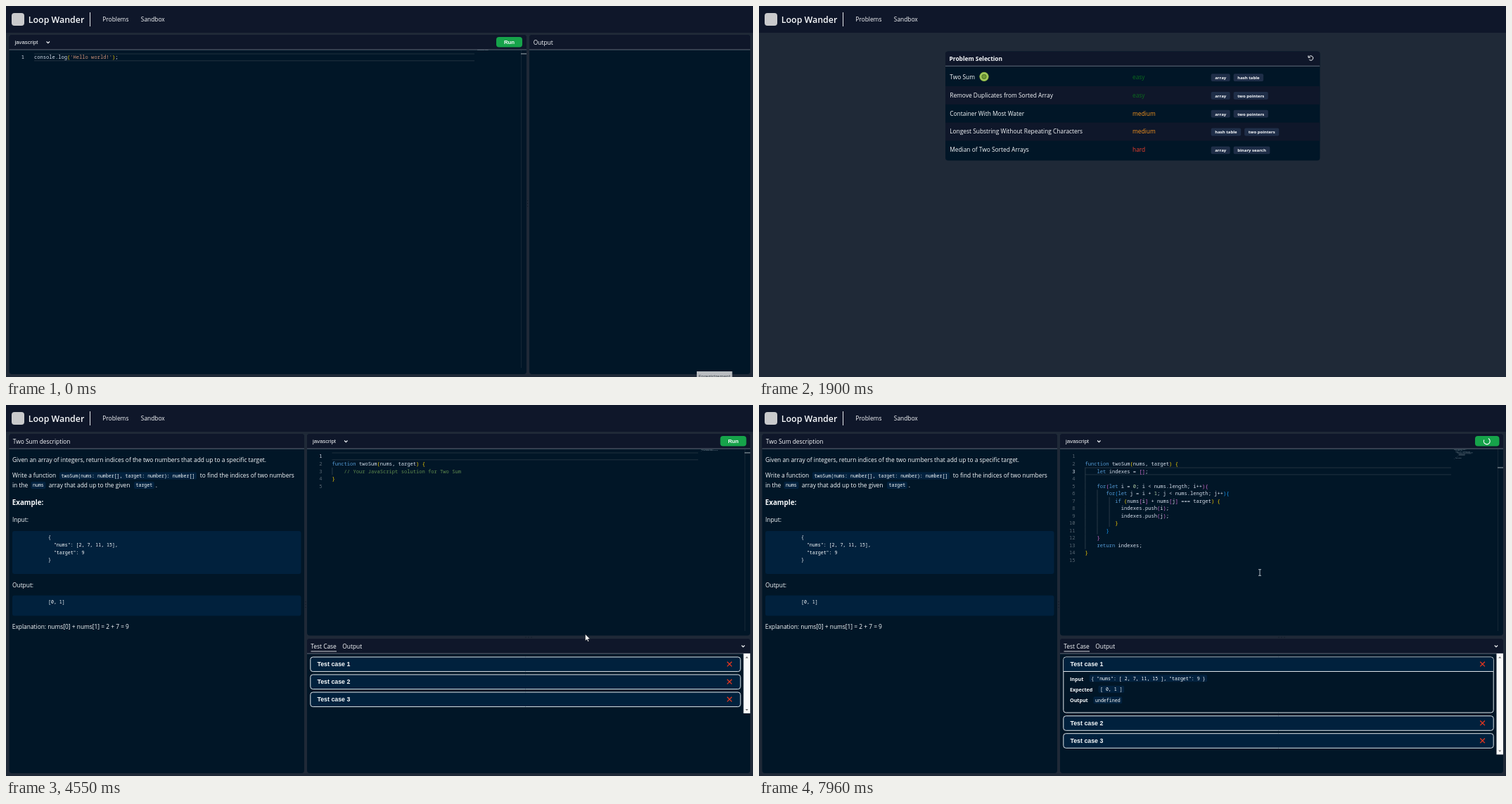
These frames come from a looping animation (1062 px wide and 527 px high, 8 s). An HTML page with a canvas:

```html
<!DOCTYPE html>
<html lang="en">
<head>
<meta charset="utf-8">
<title>Loop Wander</title>
<style>
html, body { margin: 0; width: 100%; height: 100%; overflow: hidden; background: #1f2937; }
canvas { display: block; }
</style>
</head>
<body>
<canvas id="stage" width="1062" height="527"></canvas>
<script>
const ctx = document.getElementById('stage').getContext('2d');
const LOOP = 8000, STEP = 70;
const UI = '"Open Sans", "Noto Sans", sans-serif';
const ARIAL = '"Liberation Sans", Arial, sans-serif';
const MONO = '"Noto Sans Mono", "DejaVu Sans Mono", monospace';
const C = {
  page: '#1f2937', bar: '#0f172a', editor: '#011627', block: '#01213d',
  rule: '#6b7280', white: '#f8fafc', green: '#16a34a', lit: '#16cb56', tag: '#1f2e48'
};

const T = {
  tip: 140, problems: 890, list: 1260, press: 1820, released: 2030,
  hover: 2640, run: 2980, result: 3810, expand: 4970, leave: 5600,
  paste: 6020, hover2: 6790, rerun: 6930
};

const HELLO = ["console.log('Hello world!');"];
const STUB = ['', 'function twoSum(nums, target) {', '    // Your JavaScript solution for Two Sum', '}', ''];
const SOLVED = [
  '',
  'function twoSum(nums, target) {',
  '    let indexes = [];',
  '',
  '    for(let i = 0; i < nums.length; i++){',
  '       for(let j = i + 1; j < nums.length; j++){',
  '          if (nums[i] + nums[j] === target) {',
  '            indexes.push(i);',
  '            indexes.push(j);',
  '          }',
  '       }',
  '    }',
  '    return indexes;',
  '}',
  ''
];
const PROBLEMS = [
  ['Two Sum', 'easy', 'array', 'hash table'],
  ['Remove Duplicates from Sorted Array', 'easy', 'array', 'two pointers'],
  ['Container With Most Water', 'medium', 'array', 'two pointers'],
  ['Longest Substring Without Repeating Characters', 'medium', 'hash table', 'two pointers'],
  ['Median of Two Sorted Arrays', 'hard', 'array', 'binary search']
];
const LEVEL = { easy: '#0b6b1d', medium: '#f7941d', hard: '#ef3f2c' };

// Pointer track: time, x, y, shape while heading to the next point
const TRACK = [
  [70, 1000, 524, 'arrow'], [560, 190, 34, 'arrow'], [630, 156, 20.5, 'hand'],
  [1120, 156, 20.5, 'arrow'], [1610, 318, 96, 'hand'], [2100, 318, 96, 'arrow'],
  [2500, 975, 53, 'arrow'], [2640, 1041, 47.5, 'hand'], [3120, 1041, 47.5, 'arrow'],
  [3260, 1020, 85, 'beam'], [3740, 970, 191, 'beam'], [4270, 970, 191, 'beam'],
  [4550, 823.5, 325.5, 'arrow'], [4830, 632, 368, 'hand'], [5600, 632, 368, 'arrow'],
  [5670, 626, 325, 'beam'], [5880, 600, 183, 'beam'], [6230, 600, 183, 'beam'],
  [6720, 1000, 56, 'arrow'], [6790, 1034, 49, 'hand'], [7000, 1034, 49, 'arrow'],
  [7070, 1005, 75, 'beam'], [7550, 712, 238, 'beam']
];

function rect(x, y, w, h, color) {
  ctx.fillStyle = color;
  ctx.fillRect(x, y, w, h);
}

function box(x, y, w, h, r, fill, stroke) {
  ctx.beginPath();
  ctx.roundRect(x, y, w, h, r);
  if (fill) { ctx.fillStyle = fill; ctx.fill(); }
  if (stroke) { ctx.strokeStyle = stroke; ctx.lineWidth = 1; ctx.stroke(); }
}

function line(points, color, width) {
  ctx.beginPath();
  points.forEach(([x, y], i) => i ? ctx.lineTo(x, y) : ctx.moveTo(x, y));
  ctx.strokeStyle = color;
  ctx.lineWidth = width;
  ctx.stroke();
}

// Vertically centred on the capitals
function text(str, x, cy, { size = 8.4, font = UI, weight = 400, color = C.white, align = 'left' } = {}) {
  ctx.font = `${weight} ${size}px ${font}`;
  ctx.textAlign = align;
  ctx.fillStyle = color;
  ctx.fillText(str, x, cy + size * 0.357);
  return ctx.measureText(str).width;
}

function chevron(x, y) {
  line([[x - 2.2, y - 1], [x, y + 1.2], [x + 2.2, y - 1]], C.white, 1.1);
}

function panel(x, y, w, h) {
  box(x, y, w, h, 4, C.editor);
  box(x, y, w, 21, [4, 4, 0, 0], C.bar);
  rect(x, y + 20.6, w, 0.9, C.rule);
}

function dots(x, y, dx, dy) {
  for (let i = -1; i < 2; i++) rect(x + i * dx, y + i * dy, 1, 1, '#0d1521');
}

function navbar() {
  rect(0, 0, 1062, 38, C.bar);
  box(8, 10, 18, 18, 4, '#c9cacc');
  text('Loop Wander', 31.8, 19.5, { size: 12.4, weight: 600 });
  rect(119, 9, 1, 20, '#e5e7eb');
  text('Problems', 137.3, 19);
  text('Sandbox', 191.8, 19);
}

function runButton(x, state, t) {
  if (state === 'busy') {
    box(x + 2.5, 44, 34.5, 14.5, 4, C.green);
    const gap = t / 1000 * Math.PI * 2 - 7.6;
    ctx.beginPath();
    ctx.arc(1034.8, 51.4, 4.4, gap + 0.8, gap + Math.PI * 2 - 0.8);
    ctx.strokeStyle = C.white;
    ctx.lineWidth = 1.2;
    ctx.stroke();
    return;
  }
  box(x, 44, 37, 14.5, 4, state === 'hover' ? C.lit : C.green);
  text('Run', x + 18.5, 51.5, { size: 7.8, font: ARIAL, weight: 700, align: 'center' });
}

const BRACKETS = ['#ffd700', '#da70d6', '#179fff'];
const TOKEN = /\/\/.*|'[^']*'|[A-Za-z]+|\d+|[()[\]{}]|\s+|[^\w\s]/g;

function codeLine(src, x, cy, depth) {
  const cw = 4.272;
  for (const m of src.matchAll(TOKEN)) {
    const tok = m[0];
    let color = '#d6deeb';
    if (tok.startsWith('//')) color = '#608b4e';
    else if (tok[0] === "'") color = '#ce9178';
    else if (/^(function|let|for|if|return)$/.test(tok)) color = '#569cd6';
    else if (/^\d/.test(tok)) color = '#b5cea8';
    else if ('([{'.includes(tok)) color = BRACKETS[depth++ % 3];
    else if (')]}'.includes(tok)) color = BRACKETS[--depth % 3];
    if (tok.trim()) text(tok, x + m.index * cw, cy, { size: 7.12, font: MONO, color });
  }
  return depth;
}

function editor(code, x, right, ruler, bottom, active) {
  const pitch = 10.54, top = 72.9;
  const y = top + (active - 1) * pitch;
  const edge = '#21313f';
  rect(x, y - 5.4, right - x, 1, edge);
  rect(x, y + 4.4, right - x, 1, edge);
  rect(ruler, 63, 0.8, bottom - 63, '#1b2b3a');
  rect(ruler, y - 5.6, 8, 1.2, '#8b949c');

  let depth = 0;
  code.forEach((src, i) => {
    const cy = top + i * pitch;
    text(i + 1, x - 14, cy, {
      size: 7.12, font: MONO, align: 'right', color: i + 1 === active ? '#d6deeb' : '#596773'
    });
    const indent = src ? src.search(/\S/) : depth * 4;
    for (let g = 0; g < indent; g += 4) rect(x + g * 4.272, cy - 5.2, 0.8, pitch, '#33424f');
    depth = codeLine(src, x, cy, depth);
    const lead = src.search(/\S/);
    if (lead >= 0) {
      ctx.globalAlpha = 0.4;
      for (const m of src.matchAll(/\S+/g)) {
        rect(right + 4 + m.index * 0.56, 62 + i * 1.1, m[0].length * 0.56, 0.7, '#b8c4cc');
      }
      ctx.globalAlpha = 1;
    }
  });
}

function sandbox(t) {
  panel(4.5, 41, 735.5, 482);
  panel(744, 41, 314, 482);
  dots(741, 280, 0, 4);
  text('javascript', 12.5, 51.5, { size: 7.8, font: ARIAL });
  chevron(59.8, 51.5);
  runButton(697, 'idle', t);
  text('Output', 749.8, 51.7);
  editor(HELLO, 40, 666, 732, 514, 1);
  if (t < T.tip) {
    rect(982, 519, 50.5, 8, '#b9bcc0');
    text('Enregistrement', 984.8, 527, { size: 6.3, color: '#3b4148' });
  }
}

function problems(t) {
  const loaded = t >= T.list;
  const rows = loaded ? 5 : 3;
  const height = loaded ? 155 : 103.5;
  ctx.save();
  box(265, 64.5, 532.5, height, 4, C.editor);
  ctx.clip();
  rect(265, 64.5, 532.5, 20.5, C.bar);
  rect(265, 84.8, 532.5, 0.9, C.rule);
  for (let i = 1; i < rows; i += 2) rect(265, 114 + (i - 1) * 25.8, 532.5, 25.8, C.bar);
  ctx.restore();
  text('Problem Selection', 270.5, 75, { weight: 700 });

  for (let i = 0; i < rows; i++) {
    const cy = 101 + i * 25.8;
    if (!loaded) {
      const shade = i % 2 ? '#242b3b' : '#182a37';
      [[271, 247.5], [531, 99.5], [643, 148.5]].forEach(([x, w]) => box(x, cy - 6.6, w, 13.3, 2.5, shade));
      continue;
    }
    const [name, level, ...tags] = PROBLEMS[i];
    text(name, 271.2, cy);
    text(level, 531, cy, { color: LEVEL[level] });
    let x = 642.7;
    for (const tag of tags) {
      ctx.font = `700 6px ${UI}`;
      const w = ctx.measureText(tag).width + 11;
      box(x, cy - 4.8, w, 10.8, 2, C.tag);
      text(tag, x + 5.5, cy + 0.9, { size: 6, weight: 700 });
      x += w + 5;
    }
  }

  if (loaded) {
    ctx.beginPath();
    ctx.arc(784.6, 74, 3.2, -2.7, 2.5);
    ctx.strokeStyle = C.white;
    ctx.lineWidth = 1;
    ctx.stroke();
    line([[781, 70.4], [781, 73.2], [783.8, 73.2]], C.white, 1);
  }
  if (t < T.list) {
    box(0, 518, 138, 9, [0, 3, 0, 0], '#292a2d');
    text('https://loopwander.corentinlab.live/problem', 1.5, 523, { size: 6.24, color: '#c9ccd1' });
  }
}

function chip(str, x, cy) {
  const style = { size: 6.6, font: MONO, weight: 500 };
  ctx.font = `500 6.6px ${MONO}`;
  box(x - 2.6, cy - 5, ctx.measureText(str).width + 5.2, 10, 2, '#02223f');
  text(str, x, cy, style);
}

function description() {
  panel(4.5, 41, 419.5, 482);
  text('Two Sum description', 9.8, 51.7);
  text('Given an array of integers, return indices of the two numbers that add up to a specific target.', 9, 78);
  text('Write a function', 9, 100.3);
  chip('twoSum(nums: number[], target: number): number[]', 78.5, 100.6);
  text('to find the indices of two numbers', 275.8, 100.3);
  text('in the', 9, 113.8);
  chip('nums', 38, 114.1);
  text('array that add up to the given', 60.7, 113.8);
  chip('target', 184.5, 114.1);
  text('.', 212.8, 113.8);
  text('Example:', 8.8, 138.8, { size: 9.8, weight: 700 });
  text('Input:', 9, 163.5);
  text('Output:', 9, 255.7);
  text('Explanation: nums[0] + nums[1] = 2 + 7 = 9', 8.8, 315.5);

  box(9, 179, 410.5, 61, 3, C.block);
  box(9, 270.5, 410.5, 29, 3, C.block);
  const pre = { size: 6.6, font: MONO, weight: 500 };
  ['{', '  "nums": [2, 7, 11, 15],', '  "target": 9', '}'].forEach((s, i) => text(s, 60, 188 + i * 10.65, pre));
  text('[0, 1]', 60, 280, pre);
}

function testCases(t) {
  const open = t >= T.expand;
  const failed = t >= T.result;
  const hot = t >= 4830 && t < T.leave;
  const end = open ? 496.5 : 438;
  panel(428, 332, 630, 191);
  text('Test Case', 433.3, 342.6);
  text('Output', 478.3, 342.6);
  rect(433.5, 349.5, 36.5, 0.9, '#e5e7eb');
  chevron(1048, 342.5);

  rect(1048.5, 353, 9.5, end - 353, '#fafafa');
  ctx.fillStyle = '#6b6b6b';
  for (const [y, d] of [[358.5, -1], [end - 5, 1]]) {
    ctx.beginPath();
    ctx.moveTo(1051.2, y - d);
    ctx.lineTo(1055.2, y - d);
    ctx.lineTo(1053.2, y + d * 1.2);
    ctx.fill();
  }

  for (let i = 0; i < 3; i++) {
    const y = 358 + i * 25 + (open && i ? 58.7 : 0);
    const tall = open && !i;
    const head = !i && hot ? '#152737' : C.block;
    box(432.8, y, 611.4, tall ? 79 : 20.6, 3.5, tall ? C.editor : head, '#dfe5ea');
    if (tall) {
      box(433.3, y + 0.5, 610.4, 20, [3, 3, 0, 0], head);
      rect(433, y + 20, 611, 1, '#dfe5ea');
    }
    text('Test case ' + (i + 1), 442.5, y + 10.2, { size: 8.8, font: ARIAL, weight: 700 });
    if (failed) {
      const cx = 1028.6, cy = y + 10.1, r = 3.3;
      line([[cx - r, cy - r], [cx + r, cy + r]], '#e8371f', 1.3);
      line([[cx + r, cy - r], [cx - r, cy + r]], '#e8371f', 1.3);
    }
  }

  if (open) {
    const label = { size: 7.1, weight: 700 };
    text('Input', 442, 389, label);
    chip('{ "nums": [ 2, 7, 11, 15 ], "target": 9 }', 472.3, 388.2);
    text('Expected', 442, 404.5, label);
    chip('[ 0, 1 ]', 485, 403.8);
    text('Output', 442, 419.7, label);
    chip('undefined', 478, 419.2);
  }
}

function workspace(t) {
  description();
  panel(428, 41, 630, 286.5);
  dots(425.5, 283, 0, 4);
  dots(742.5, 329.5, 4, 0);
  text('javascript', 436, 51.5, { size: 7.8, font: ARIAL });
  chevron(483.3, 51.5);

  let state = 'idle';
  if ((t >= T.run && t < T.result) || t >= T.rerun) state = 'busy';
  else if ((t >= T.hover && t < T.run) || t >= T.hover2) state = 'hover';
  runButton(1015.5, state, t);

  const pasted = t >= T.paste;
  editor(pasted ? SOLVED : STUB, 463.5, 984, 1050, 321, pasted ? 3 : 1);
  testCases(t);
}

const SHAPES = {
  arrow: 'M0 0V9.6L2.3 7.5L3.8 10.8L5.3 10.1L3.9 7H6.9Z',
  hand: 'M-1 1Q0 -.6 1 1V5L5 6Q6 6.2 6 7.5V9.5L5 12.5H-.3L-3 8.5Q-3.4 7 -2 7L-1 8Z'
};
for (const k in SHAPES) SHAPES[k] = new Path2D(SHAPES[k]);

function pointer(t) {
  if (t < TRACK[0][0] || (t >= T.press && t < T.released)) return;
  let i = TRACK.length - 1;
  while (TRACK[i][0] > t) i--;
  const [t0, x0, y0, kind] = TRACK[i];
  const [t1, x1, y1] = TRACK[i + 1] || [LOOP, x0, y0];
  const k = (t - t0) / (t1 - t0);
  const x = x0 + (x1 - x0) * k, y = y0 + (y1 - y0) * k;
  ctx.save();
  ctx.translate(x, y);
  if (kind === 'beam') {
    line([[-2, -4.3], [2, -4.3]], '#c5ccd3', 0.9);
    line([[0, -4.3], [0, 4.3]], '#c5ccd3', 0.9);
    line([[-2, 4.3], [2, 4.3]], '#c5ccd3', 0.9);
  } else {
    ctx.fillStyle = '#fff';
    ctx.fill(SHAPES[kind]);
    ctx.strokeStyle = '#10151c';
    ctx.lineWidth = 0.6;
    ctx.stroke(SHAPES[kind]);
  }
  ctx.restore();
}

function clickMark(t) {
  if (t < T.press || t >= T.released) return;
  [[6.6, '#8fbb45'], [5.6, '#a5c95f'], [3.6, '#58812a'], [2.4, '#729b35']].forEach(([r, color]) => {
    ctx.beginPath();
    ctx.arc(320, 100.3, r, 0, Math.PI * 2);
    ctx.fillStyle = color;
    ctx.fill();
  });
}

function draw(now) {
  const t = Math.floor((now % LOOP) / STEP) * STEP;
  rect(0, 0, 1062, 527, C.page);
  navbar();
  if (t < T.problems) sandbox(t);
  else if (t < T.released) problems(t);
  else workspace(t);
  clickMark(t);
  pointer(t);
}

let start;
function tick(now) {
  start ??= now;
  draw(now - start);
  requestAnimationFrame(tick);
}
requestAnimationFrame(tick);
</script>
</body>
</html>
```
